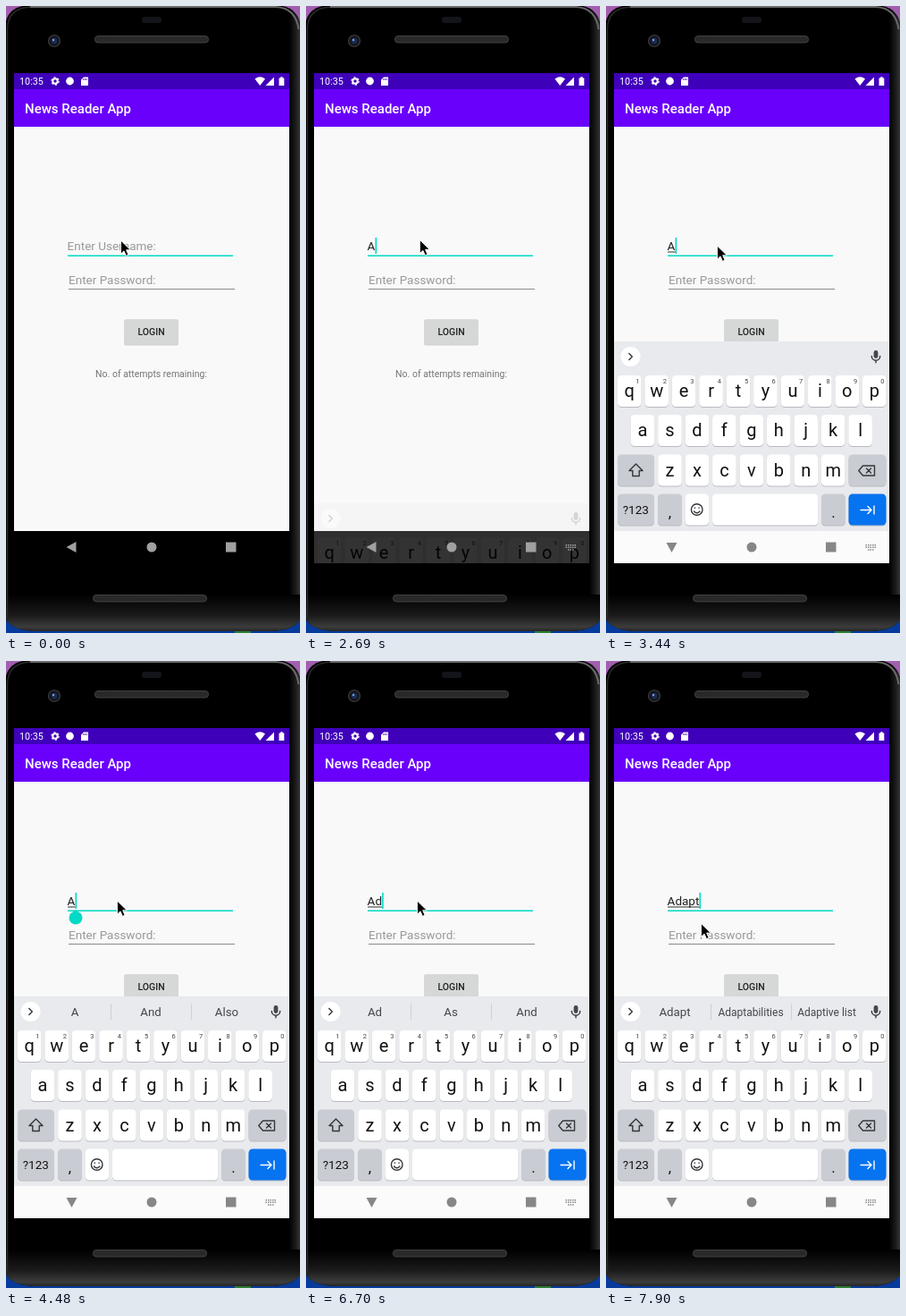
These frames come from a looping animation (329x701 px, 8 s). An HTML page:

```html
<!DOCTYPE html>
<html lang="en">
<head>
<meta charset="utf-8">
<title>Login screen</title>
<style>
  html, body { margin: 0; width: 100%; height: 100%; overflow: hidden; background: #000; }
  svg { display: block; width: 100vw; height: 100vh; }
  text { font-family: Roboto, "Liberation Sans", sans-serif; white-space: pre; }
  .mid { text-anchor: middle; }
  .field { font-size: 13.5px; }
  .hint { fill: #999; }
  .key { font-size: 20px; fill: #111; text-anchor: middle; }
  .digit { font-size: 7.5px; fill: #444; text-anchor: middle; }
  .suggestion { font-size: 13.3px; fill: #44474b; text-anchor: middle; }
  .line { fill: none; stroke: #34373b; stroke-width: 1.4; stroke-linecap: round; stroke-linejoin: round; }
  .teal { fill: #03dac5; }
</style>
</head>
<body>
<svg viewBox="0 0 329 701" preserveAspectRatio="none">
  <defs>
    <clipPath id="screen"><rect x="9" y="75" width="308" height="548"/></clipPath>
    <pattern id="mesh" width="3" height="3" patternUnits="userSpaceOnUse">
      <rect width="3" height="3" fill="#242424"/><path d="M0 3L3 0" stroke="#3a3a3a" stroke-width=".7"/>
    </pattern>
    <linearGradient id="chin" x1="0" y1="0" x2="0" y2="1">
      <stop offset="0" stop-color="#000"/><stop offset=".55" stop-color="#1a1a1a"/>
      <stop offset=".86" stop-color="#3c3c3c"/><stop offset="1" stop-color="#222"/>
    </linearGradient>
    <linearGradient id="side">
      <stop offset="0" stop-color="#000"/><stop offset=".6" stop-color="#1c1c1c"/>
      <stop offset="1" stop-color="#333"/>
    </linearGradient>
    <path id="body" d="M-1 24Q0 0 27 -1H302Q327 0 330 24V684Q324 698 297 699H32Q5 698 -1 684z"/>
    <clipPath id="bodyClip"><use href="#body"/></clipPath>
  </defs>

  <!-- Desktop and phone body -->
  <rect width="329" height="350" fill="#a25fb0"/>
  <rect y="350" width="329" height="351" fill="#063b9c"/>
  <rect x="256" y="699" width="18" height="2" fill="#2f7d32"/>
  <use href="#body"/>
  <g clip-path="url(#bodyClip)">
    <rect x="317" width="12" height="701" fill="url(#side)"/>
    <rect y="658" width="329" height="42" fill="url(#chin)"/>
    <path d="M1.5 684V26Q2 2 27 1.2" fill="none" stroke="#2c2c2c" stroke-width="1.5"/>
    <path d="M27 1H302Q324 2 327.5 26" fill="none" stroke="#6a6a6a" stroke-width="2"/>
  </g>
  <rect x="152" y="12" width="22" height="7" rx="3" fill="#14141b"/>
  <circle cx="54" cy="39" r="6.5" fill="#15171d" stroke="#3c3c3f" stroke-width="1.2"/>
  <circle cx="54" cy="39" r="3.2" fill="#1b2d57"/>
  <circle cx="53" cy="38" r="1.2" fill="#7f9bd0"/>
  <g fill="url(#mesh)" stroke="#414141">
    <rect x="99.5" y="33.5" width="127" height="7.5" rx="3.5"/>
    <rect x="97.5" y="658.5" width="127" height="7.5" rx="3.5"/>
  </g>

  <g clip-path="url(#screen)">
    <rect x="9" y="587" width="308" height="36"/>
    <rect x="9" y="135" width="308" height="452" fill="#f9f9f9"/>
    <rect x="9" y="75" width="308" height="18.5" fill="#3f00ba"/>
    <rect x="9" y="93" width="308" height="42" fill="#6900fb"/>

    <!-- Status bar -->
    <g fill="#fff">
      <text x="15" y="88" font-size="10.8">10:35</text>
      <circle cx="55" cy="84" r="2.7" fill="none" stroke="#fff" stroke-width="2"/>
      <circle cx="55" cy="84" r="4.1" fill="none" stroke="#fff" stroke-width="1.3" stroke-dasharray="2.15"/>
      <circle cx="71.5" cy="84" r="4.4"/>
      <path d="M87 79.5h5v9.5h-8v-6.5z"/>
      <path d="M86.7 81v2M88.5 81v2M90.3 81v2" stroke="#3f00ba" stroke-width=".8"/>
      <path d="M278.5 81.5Q284.2 77 290 81.5L284.2 89z"/>
      <path d="M300 79.5V89H290.5z"/>
      <path d="M305.5 80.5h1.7v-1.3h2.4v1.3h1.7V89h-5.8z"/>
      <text x="21" y="120" font-size="15" font-weight="500">News Reader App</text>
    </g>

    <!-- Form -->
    <text id="userHint" class="field hint" x="68.6" y="273">Enter Username:</text>
    <text id="user" class="field" x="68.6" y="273" fill="#222"></text>
    <rect id="composing" x="69" y="274.5" height="1" fill="#333"/>
    <rect class="teal" x="69" y="278.5" width="185" height="1.5"/>
    <rect id="caret" class="teal" y="259" width="1.6" height="18"/>
    <text class="field hint" x="70" y="311">Enter Password:</text>
    <rect x="70" y="316" width="186" height="1" fill="#8b8b8b"/>
    <rect x="132" y="350.5" width="61" height="29" rx="2" fill="#d0d1d1"/>
    <rect x="132" y="350.5" width="61" height="28" rx="2" fill="#d6d7d7"/>
    <text class="mid" x="162.5" y="368.4" font-size="10.5" font-weight="500" fill="#222">LOGIN</text>
    <text class="mid" x="162.5" y="415" font-size="10.5" fill="#757575">No. of attempts remaining:</text>
    <path id="handle" class="teal" d="M78 278.5L83.5 282A7.5 7.5 0 1 1 72.5 282z"/>

    <!-- Navigation bar -->
    <rect id="nav" x="9" y="587" width="308" height="36" fill="#fbfbfb"/>
    <g id="keyboard">
      <rect x="9" y="375" width="308" height="212" fill="#e8eaed"/>
      <circle cx="27.5" cy="392" r="11" fill="#fff"/>
      <path class="line" d="M25.8 388.5l3.5 3.5-3.5 3.5"/>
      <g id="suggestions">
        <path d="M117.5 383v18M207.5 383v18" stroke="#cfd1d5"/>
        <text class="suggestion" x="77" y="397"></text>
        <text class="suggestion" x="162" y="397"></text>
        <text class="suggestion" x="247" y="397"></text>
      </g>
      <rect x="299.6" y="385" width="4.8" height="9" rx="2.4" fill="#44474b"/>
      <path class="line" d="M297.3 391.5a4.7 4.7 0 0 0 9.4 0M302 396.3v2.4"/>
      <g id="keys"></g>
      <path class="line" d="M33.5 512l7.5 7.5h-3.8v6h-7.4v-6H26z"/>
      <path class="line" d="M287.5 514h13v11h-13l-4.7-5.5zM291.5 517l5 5m0-5l-5 5"/>
      <g class="line">
        <circle cx="101.7" cy="563" r="6.3"/>
        <path d="M98.5 565q3.2 3.6 6.4 0M99.4 561v.3M104 561v.3"/>
      </g>
      <path class="line" style="stroke:#fff" d="M285 563.5h11.5M293 559.5l4 4-4 4M300 559v9"/>
    </g>
    <g id="navIcons">
      <path id="back" d="M67.5 605l11-6v12z"/>
      <circle cx="163" cy="605" r="5.5"/>
      <rect x="246" y="599.5" width="11.5" height="11"/>
      <path id="imeIcon" d="M290.5 602.7h11.5M290.5 605.2h11.5M293 608h6.5" fill="none" stroke-width="1.5" stroke-dasharray="1.5 1"/>
    </g>
  </g>
  <path id="pointer" d="M0 0V15.2L3.6 11.9 6 17.4 8.7 16.2 6.3 10.8H11z" fill="#000" stroke="#fff" stroke-width="1"/>
</svg>

<script>
const LOOP = 8000;
const $ = id => document.getElementById(id);

// Keyboard keys
const keyCap = (x, y, w, fill) =>
  `<rect x="${x}" y="${y + 1}" width="${w}" height="35" rx="4.5" fill="#b9bbc0"/>` +
  `<rect x="${x}" y="${y}" width="${w}" height="35" rx="4.5" fill="${fill}"/>`;
const label = (x, y, text, cls = 'key', size = '') =>
  `<text class="${cls}" x="${x}" y="${y}" ${size && `style="font-size:${size}px"`}>${text}</text>`;

function letterRow(letters, firstX, y, digits = '') {
  return [...letters].map((letter, i) => {
    const x = firstX + i * 30.45;
    return keyCap(x - 13.3, y, 26.6, '#fff') + label(x, y + 24, letter) +
      (digits ? label(x + 9.2, y + 9, digits[i], 'digit') : '');
  }).join('');
}

const GREY = '#c9ccd2';
$('keys').innerHTML =
  letterRow('qwertyuiop', 26.2, 413, '1234567890') +
  letterRow('asdfghjkl', 41, 457) +
  letterRow('zxcvbnm', 71.5, 501.5) +
  keyCap(13, 501.5, 41, GREY) + keyCap(271.5, 501.5, 42, GREY) +
  keyCap(13, 545.5, 41, GREY) + keyCap(58, 545.5, 27, GREY) +
  keyCap(88.5, 545.5, 26.5, '#fff') + keyCap(119, 545.5, 118.5, '#fff') +
  keyCap(241, 545.5, 27, GREY) + keyCap(271.5, 545.5, 42, '#0673f0') +
  label(33.3, 568, '?123', 'key', 13.5) +
  label(71.5, 572, ',', 'key', 17) + label(254.5, 572, '.', 'key', 17);

// Each step overrides part of the state from its time on
const steps = [
  [0, { text: '', caret: false, pointer: [128.4, 262], ime: false, keyboard: 'hidden',
        composing: false, words: null, handle: false, light: false, turn: 0 }],
  [150, { pointer: [127.3, 261.5] }],
  [600, { caret: true }],
  [1040, { caret: false }],
  [1490, { caret: true }],
  [2090, { caret: false }],
  [2390, { ime: true }],
  [2690, { text: 'A', caret: true, keyboard: 'rising' }],
  [2840, { keyboard: 'open', turn: -80 }],
  [2990, { light: true, turn: -90, composing: true }],
  [3290, { pointer: [126, 265] }],
  [3440, { pointer: [124.4, 268] }],
  [3590, { handle: true }],
  [3740, { words: ['A', 'And', 'Also'] }],
  [4030, { caret: false }],
  [4480, { caret: true }],
  [4770, { text: 'Ad', handle: false }],
  [4920, { words: ['Ad', 'As', 'And'] }],
  [5370, { caret: false }],
  [5810, { caret: true }],
  [6260, { caret: false }],
  [6700, { caret: true }],
  [7000, { text: 'Ada' }],
  [7150, { words: ['Ada', 'Adapt', 'Adage'] }],
  [7300, { text: 'Adap', pointer: [122, 271] }],
  [7450, { words: ['Adap', 'Adapt', 'Adapts'], pointer: [118, 276] }],
  [7600, { text: 'Adapt', pointer: [114, 282] }],
  [7750, { words: ['Adapt', 'Adaptabilities', 'Adaptive list'], pointer: [110, 288] }],
  [7900, { pointer: [106.4, 293.3] }]
];

const show = (id, on) => $(id).setAttribute('visibility', on ? 'visible' : 'hidden');
const wordLabels = document.querySelectorAll('.suggestion');

function draw(t) {
  const s = Object.assign({}, ...steps.filter(([at]) => at <= t).map(([, change]) => change));
  $('user').textContent = s.text;
  const width = s.text ? $('user').getComputedTextLength() : 0;
  show('userHint', !s.text);
  show('caret', s.caret);
  $('caret').setAttribute('x', 69 + width - (s.text ? 0.3 : 0));
  show('composing', s.composing);
  $('composing').setAttribute('width', width);
  show('handle', s.handle);

  show('keyboard', s.keyboard !== 'hidden');
  const rising = s.keyboard === 'rising';
  $('keyboard').setAttribute('transform', `translate(0 ${rising ? 181 : 0})`);
  $('keyboard').setAttribute('opacity', rising ? 0.2 : 1);
  $('suggestions').setAttribute('opacity', s.words ? 1 : 0);
  wordLabels.forEach((el, i) => {
    const word = s.words ? s.words[i] : '';
    el.textContent = word;
    el.style.fontSize = word.length > 12 ? '12px' : '';
  });

  const iconColor = s.light ? '#878787' : '#a0a0a0';
  show('nav', s.light);
  $('navIcons').setAttribute('fill', iconColor);
  $('imeIcon').setAttribute('stroke', iconColor);
  $('back').setAttribute('transform', `rotate(${s.turn} 73.5 605)`);
  show('imeIcon', s.ime);
  $('pointer').setAttribute('transform', `translate(${s.pointer})`);
}

const start = performance.now();
function tick() {
  draw((performance.now() - start) % LOOP);
  requestAnimationFrame(tick);
}
tick();
</script>
</body>
</html>
```
